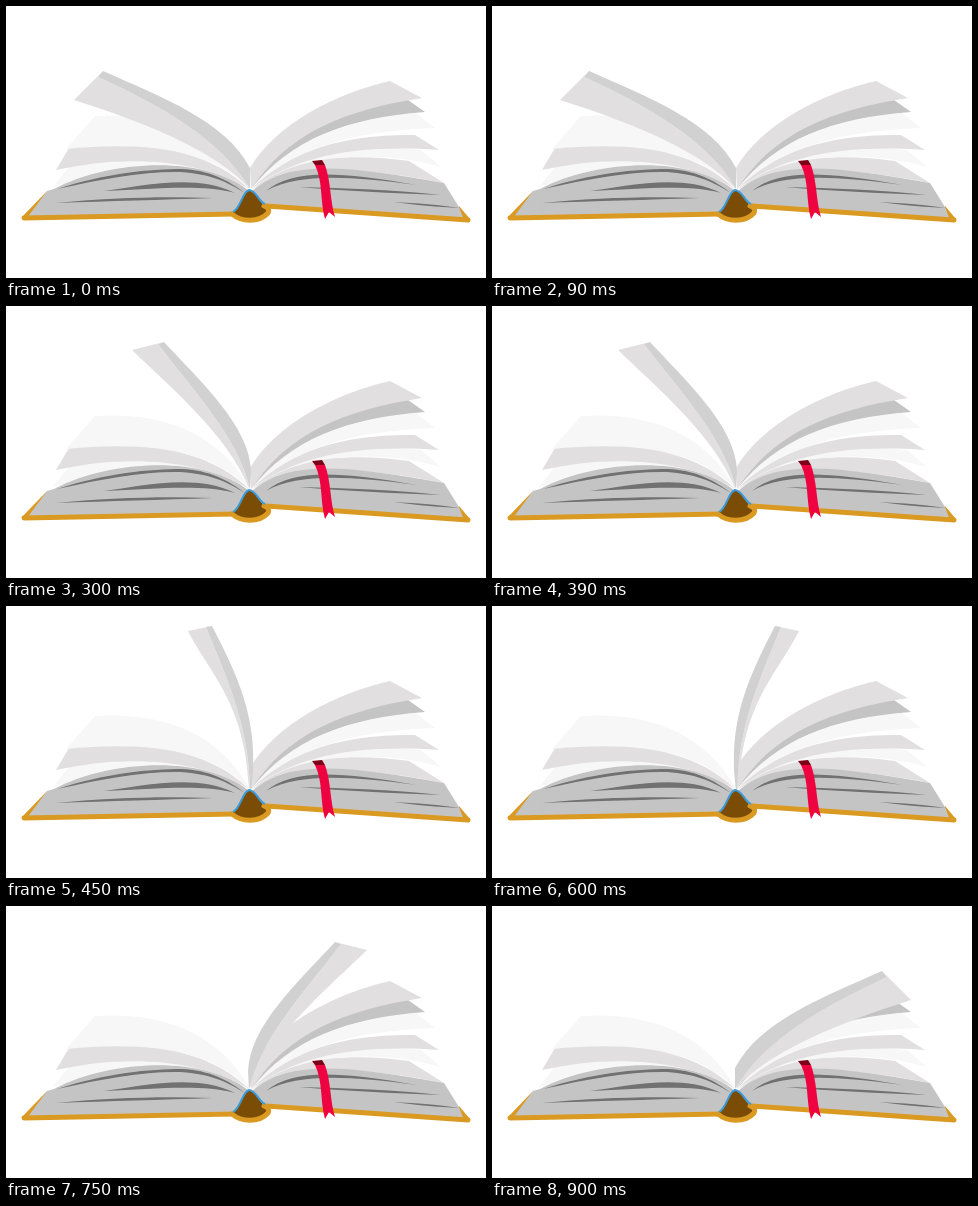
An HTML page for the animation above (1.05 s loop, 480 by 272 pixels).

```html
<!DOCTYPE html>
<html lang="en">
<head>
<meta charset="utf-8">
<title>Open book</title>
<style>
  html, body { margin: 0; width: 100%; height: 100%; overflow: hidden; background: #fff; }
  svg { display: block; width: 100%; height: 100%; }
  .white { fill: #f7f7f7; }
  .pale { fill: #e1dfe0; }
  .fold { fill: #d1d1d1; }
  .block { fill: #c5c4c4; }
  .line { fill: #727171; }
  .corner { fill: #da9a22; }
  .cover { fill: none; stroke: #da9a22; stroke-width: 5; stroke-linecap: round; stroke-linejoin: round; }
</style>
</head>
<body>
<svg viewBox="0 0 480 272">
  <path class="corner" d="M16 211L41 185L26 212ZM453 200L464 213L452 213Z"/>

  <!-- left half -->
  <path class="white" d="M62 162L47 181C110 160 190 155 243 184C190 145 110 145 62 162Z"/>
  <path class="block" d="M21 212L41 185L48 183C105 153 200 149 243 185L228 208Z"/>
  <path class="pale" d="M63 142L50 164C110 150 190 150 243 183C195 135 110 135 63 142Z"/>
  <path class="white" d="M89 110C150 106 210 122 244 183C205 143 140 135 60 143Z"/>
  <path class="line" d="M51 183C100 167 145 163 175 163C203 164 222 174 239 187C220 175 203 168 175 166C140 165 100 172 51 183Z"/>
  <path class="line" d="M98 185C135 180 190 167 229 187C195 178 150 183 98 185Z"/>
  <path class="line" d="M50 197C100 192 155 190 207 192C155 194 105 195 50 197Z"/>

  <!-- right half -->
  <path class="white" d="M415 144L435 161C360 140 290 152 245 183C290 138 360 138 415 144Z"/>
  <path class="pale" d="M403 155L438 177C360 162 290 155 245 184C290 148 350 148 403 155Z"/>
  <path class="block" d="M246 185C285 152 345 161 438 177L453 201L458 214L261 200Z"/>
  <path class="pale" d="M409 129L433 144C350 138 290 150 245 183C285 143 340 128 409 129Z"/>
  <path class="white" d="M410 107L429 122C340 125 285 145 245 183C280 130 330 112 410 107Z"/>
  <path class="block" d="M402 94L419 106C340 112 285 133 245 183C280 130 330 102 402 94Z"/>
  <path class="pale" d="M384 75L416 92C338 104 282 127 245 183L244 162C270 118 330 87 384 75Z"/>
  <path class="line" d="M260 185C287 163 330 165 411 179C342 170 293 167 260 185Z"/>
  <path class="line" d="M293 181C340 182 390 184 435 189C385 187 340 185 293 181Z"/>
  <path class="line" d="M387 196C410 197 435 199 454 202C430 201 410 199 387 196Z"/>

  <path class="cover" d="M228 208L18 212M260 200L462 214"/>

  <g id="flaps"></g>

  <!-- bookmark -->
  <path fill="#ee0240" d="M309 159L319 159C325 175 324 195 329 211L323 206L319 213C314 195 317 175 309 159Z"/>
  <path fill="#7d0016" d="M306 155L316 154L319 159L309 159Z"/>

  <!-- spine -->
  <path fill="#7a4c06" d="M227 207C235 202 236 186 243 184C252 186 253 198 260 199L263 206C255 216 235 215 227 207Z"/>
  <path class="cover" d="M226 208C235 216 253 217 262 207C264 203 261 201 258 200"/>
  <path fill="none" stroke="#3a9bdb" stroke-width="2" d="M227 206C235 202 236 186 243 184C251 185 252 195 259 198"/>
</svg>
<script>
const STEP = 150;

// Each page: outer edge, fold and inner edge, all running from the tip to the spine.
const low = {
  outer: 'M97 65C155 91 220 115 244 162L244 185',
  fold: 'M92 71C155 100 215 133 244 183',
  inner: 'L68 94C150 120 212 148 243 182'
};
const rising = {
  outer: 'M124 51C168 81 232 122 244 165L244 185',
  fold: 'M119 53C160 90 225 130 244 183',
  inner: 'L94 67C150 97 215 128 243 182'
};
const high = {
  outer: 'M158 36C193 74 244 120 245 165L244 185',
  fold: 'M152 38C185 82 232 130 244 183',
  inner: 'L126 44C165 82 220 127 243 182'
};
const upright = {
  outer: 'M206 20C232 70 250 110 247 165L245 185',
  fold: 'M200 21C222 75 243 120 244 183',
  inner: 'L182 25C205 70 238 95 243 182'
};

// mirror is the sum of an x position and its reflection.
const poses = [
  { page: low },
  { page: rising },
  { page: high },
  { page: upright },
  { page: upright, mirror: 489 },
  { page: high, mirror: 487 },
  { page: low, mirror: 487 }
];

const flaps = document.getElementById('flaps');

function addPath(parent, className, d) {
  const path = document.createElementNS(flaps.namespaceURI, 'path');
  path.setAttribute('class', className);
  path.setAttribute('d', d);
  parent.append(path);
}

// Runs a curve "Mx yC..." backwards so it can close a shape.
function reverse(d) {
  const [x0, y0, x1, y1, x2, y2, x3, y3] = d.match(/\d+/g);
  return `L${x3} ${y3}C${x2} ${y2} ${x1} ${y1} ${x0} ${y0}`;
}

poses.forEach(({ page, mirror }, i) => {
  const group = document.createElementNS(flaps.namespaceURI, 'g');
  if (mirror) group.setAttribute('transform', `matrix(-1 0 0 1 ${mirror} 0)`);
  const tip = page.outer.match(/^M\d+ \d+/)[0];
  addPath(group, 'pale', tip + page.inner + reverse(page.fold) + 'Z');
  addPath(group, 'fold', page.outer + reverse(page.fold) + 'Z');
  flaps.append(group);

  const count = poses.length;
  group.animate([
    { opacity: 1, offset: 0, easing: 'step-end' },
    { opacity: 0, offset: 1 / count, easing: 'step-end' },
    { opacity: 0, offset: 1 }
  ], { duration: count * STEP, delay: (i - count) * STEP, iterations: Infinity });
});
</script>
</body>
</html>
```
